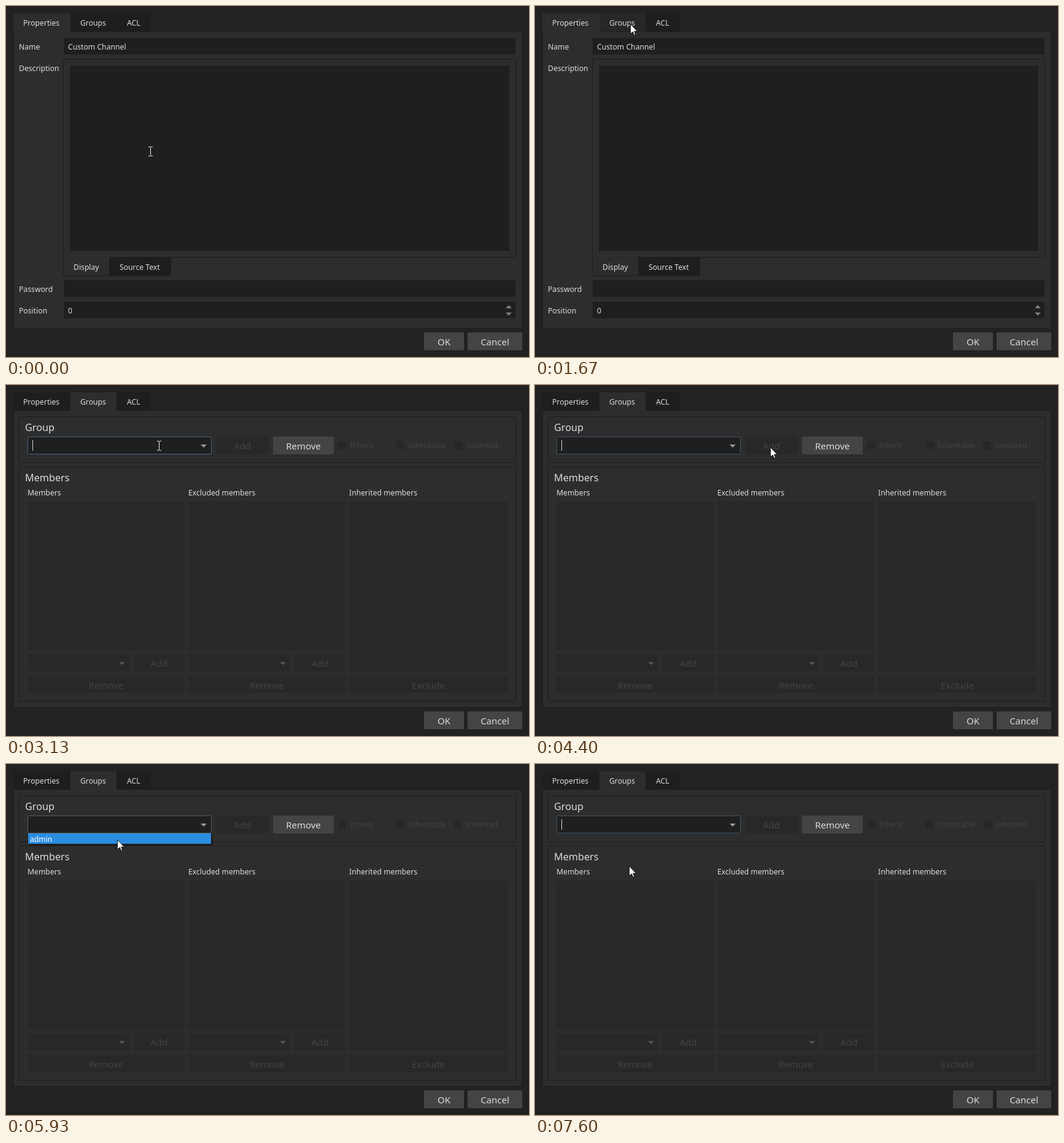
Recreate the animation shown at these times as an HTML page. Size 852x572 px, loop 8 s.

```html
<!DOCTYPE html>
<html lang="en">
<head>
<meta charset="utf-8">
<title>Channel editor</title>
<style>
  html, body { margin: 0; width: 100%; height: 100%; overflow: hidden; background: #222; }
  svg { display: block; font-family: "Noto Sans", "Open Sans", sans-serif; }
  text { white-space: pre; }
</style>
</head>
<body>
<svg id="stage" width="852" height="572" viewBox="0 0 852 572"></svg>
<script>
const LOOP = 8000;
const C = {
  panel: '#2d2d2d', line: '#1c1c1c', field: '#1f1f1f', tab: '#1e1e1e', button: '#444',
  off: '#282828', offText: '#434343', text: '#dcdcdc', accent: '#2a8de0'
};
const stage = document.getElementById('stage');

function add(parent, tag, attrs) {
  const el = document.createElementNS('http://www.w3.org/2000/svg', tag);
  for (const key in attrs) el.setAttribute(key, attrs[key]);
  return parent.appendChild(el);
}
const group = parent => add(parent, 'g', {});

// Boxes are given by their outer edges.
const box = (g, x1, y1, x2, y2, fill, rx = 1) =>
  add(g, 'rect', { x: x1, y: y1, width: x2 - x1, height: y2 - y1, rx, fill });
const frame = (g, x1, y1, x2, y2, stroke, fill = 'none', rx = 2) =>
  add(g, 'rect', { x: x1 + .5, y: y1 + .5, width: x2 - x1 - 1, height: y2 - y1 - 1, rx, stroke, fill });

function label(g, x, y, str, size = 12.2, fill = C.text, anchor = 'start') {
  add(g, 'text', { x, y, 'font-size': size, fill, 'text-anchor': anchor }).textContent = str;
}
function button(g, x1, y1, x2, y2, str, on) {
  box(g, x1, y1, x2, y2, on ? C.button : C.off);
  label(g, (x1 + x2) / 2, y1 + 21, str, 15, on ? C.text : C.offText, 'middle');
}
// dir 1 points down, -1 points up
const triangle = (g, x, y, fill, dir = 1) =>
  add(g, 'path', { d: `M${x - 5} ${y - 2.5 * dir}h10l-5 ${5 * dir}z`, fill });

// Dialog shell
frame(stage, 12, 41, 841, 526, C.line, C.panel);
button(stage, 681, 532, 746, 561, 'OK', true);
button(stage, 752, 532, 841, 561, 'Cancel', true);
const tabs = [['Properties', 12, 105, 28], ['Groups', 105, 180, 121], ['ACL', 180, 236, 197]]
  .map(([name, x1, x2, tx]) => {
    const bg = box(stage, x1, 12, x2, 41, C.tab);
    label(stage, tx, 32, name);
    return { bg, x1, x2 };
  });
const tabJoin = box(stage, 13, 40, 105, 42, C.panel, 0);

// Properties page
const props = group(stage);
[['Name', 71], ['Description', 106], ['Password', 466], ['Position', 501]]
  .forEach(([str, y]) => label(props, 21, y, str));
[52, 447, 482].forEach(y => box(props, 94, y, 830, y + 27, C.field));
const nameRing = frame(props, 93, 51, 831, 80, '#5a5a5a');
label(props, 101, 71, 'Custom Channel');
label(props, 101, 501, '0');
triangle(props, 819, 490, '#808080', -1);
triangle(props, 819, 502, '#808080');
frame(props, 93, 86, 831, 410, C.line);
box(props, 104, 97, 820, 399, C.field);
frame(props, 93, 409, 169, 440, C.line, C.panel);
box(props, 94, 408, 168, 411, C.panel, 0);
box(props, 168, 410, 269, 440, C.tab);
label(props, 110, 430, 'Display');
label(props, 185, 430, 'Source Text');

// Groups page
const groups = group(stage);
frame(groups, 21, 51, 831, 127, C.line);
frame(groups, 21, 133, 831, 516, C.line);
label(groups, 31, 75, 'Group', 16.2);
label(groups, 31, 157, 'Members', 16.2);
const combo = frame(groups, 35, 84, 335, 113, '#3d5468', C.field, 1);
triangle(groups, 322, 99.5, '#999');
const caret = box(groups, 43, 90, 44, 107, C.text, 0);
button(groups, 342, 84, 428, 113, 'Add', false);
button(groups, 435, 84, 534, 113, 'Remove', true);
[['Inherit', 541], ['Inheritable', 636], ['Inherited', 730]].forEach(([str, x]) => {
  box(groups, x, 92, x + 13, 105, '#272727');
  label(groups, x + 19.5, 103, str, 11.9, C.offText);
});
[['Members', 35, 291], ['Excluded members', 297, 553], ['Inherited members', 559, 817]]
  .forEach(([str, x1, x2], i) => {
    const last = i === 2;
    label(groups, x1, 180, str);
    box(groups, x1, 190, x2, last ? 467 : 432, C.off);
    button(groups, x1, 474, x2, 502, last ? 'Exclude' : 'Remove', false);
    if (last) return;
    box(groups, x1, 439, x1 + 166, 467, C.off);
    triangle(groups, x1 + 154, 454, '#555');
    button(groups, x1 + 173, 438, x2, 467, 'Add', false);
  });
const popup = group(groups);
add(popup, 'rect', { x: 38, y: 116, width: 299, height: 17, fill: '#000', opacity: .3 });
box(popup, 35, 113, 335, 131, '#1a1a1a', 0);
box(popup, 36, 113, 334, 130, C.accent, 0);
label(popup, 39, 127, 'admin', 12.2, '#fff');

// Pointers, drawn around their hot spot
const arrow = add(stage, 'path', {
  d: 'M.5 .5V16.5L4.2 13L6.8 18.5L9 17.5L6.6 12.2H11.6Z',
  fill: '#fff', stroke: '#000', 'stroke-width': .9
});
const beam = add(stage, 'path', {
  d: 'M-3 -8h3v1h-3zM1 -8h3v1h-3zM0 -7h1v14h-1zM-3 7h3v1h-3zM1 7h3v1h-3z', fill: '#f4f4f4'
});

// Pointer path: time, x, y
const path = [
  [0, 235, 237], [400, 207, 172], [870, 171, 113], [1070, 171, 74], [1200, 171, 74],
  [1400, 167, 50], [1670, 155, 29], [2070, 155, 29], [2270, 185, 75], [2600, 262, 97],
  [2930, 351, 107], [3270, 178, 93], [3670, 178, 93], [3730, 183, 96], [4200, 183, 96],
  [4400, 383, 101], [4600, 399, 105], [4930, 321, 103], [5000, 321, 103], [5270, 252, 122],
  [5530, 205, 131], [5870, 190, 124], [6200, 140, 120], [6530, 112, 94], [6600, 112, 94],
  [7070, 153, 166], [LOOP, 153, 166]
];
const caretFlips = [1930, 2460, 3000, 3470, 4000, 4530, 6530, 7070, 7600];
const PAGE_AT = 1930, OPEN_AT = 5070, CLOSE_AT = 6470;

function pointerAt(t) {
  const i = path.findIndex(p => p[0] > t);
  const [t0, x0, y0] = path[i - 1], [t1, x1, y1] = path[i];
  const k = (t - t0) / (t1 - t0);
  return [Math.round(x0 + (x1 - x0) * k), Math.round(y0 + (y1 - y0) * k)];
}
const show = (el, on) => el.setAttribute('visibility', on ? 'inherit' : 'hidden');

function draw(t) {
  const tick = Math.round(Math.floor((t + 4) * 15 / 1000) * 20 / 3) * 10;
  const [x, y] = pointerAt(Math.min(tick, LOOP - 1));
  const within = (x1, y1, x2, y2) => x >= x1 && x < x2 && y >= y1 && y < y2;
  const onGroups = t >= PAGE_AT;
  const open = t >= OPEN_AT && t < CLOSE_AT;

  show(props, !onGroups);
  show(groups, onGroups);
  tabs.forEach(({ bg, x1, x2 }, i) => {
    const active = i === (onGroups ? 1 : 0);
    bg.setAttribute('fill', active ? C.panel : within(x1, 12, x2, 41) ? '#272727' : C.tab);
    if (active) {
      tabJoin.setAttribute('x', x1 + (i ? 0 : 1));
      tabJoin.setAttribute('width', x2 - x1 - (i ? 0 : 1));
    }
  });

  const overName = !onGroups && within(93, 51, 831, 80);
  const overText = !onGroups && within(104, 97, 820, 399);
  const overCombo = onGroups && within(35, 84, 335, 113);
  show(nameRing, overName);
  combo.setAttribute('stroke', open ? '#5a5a5a' : overCombo ? '#48637a' : '#3d5468');
  show(popup, open);
  show(caret, caretFlips.filter(f => f <= t).length % 2 === 1);

  const typing = overName || overText || (overCombo && !open && x < 312);
  show(beam, typing);
  show(arrow, !typing);
  (typing ? beam : arrow).setAttribute('transform', `translate(${x} ${y})`);
}

const start = performance.now();
function loop() {
  draw((performance.now() - start) % LOOP);
  requestAnimationFrame(loop);
}
loop();
</script>
</body>
</html>
```
